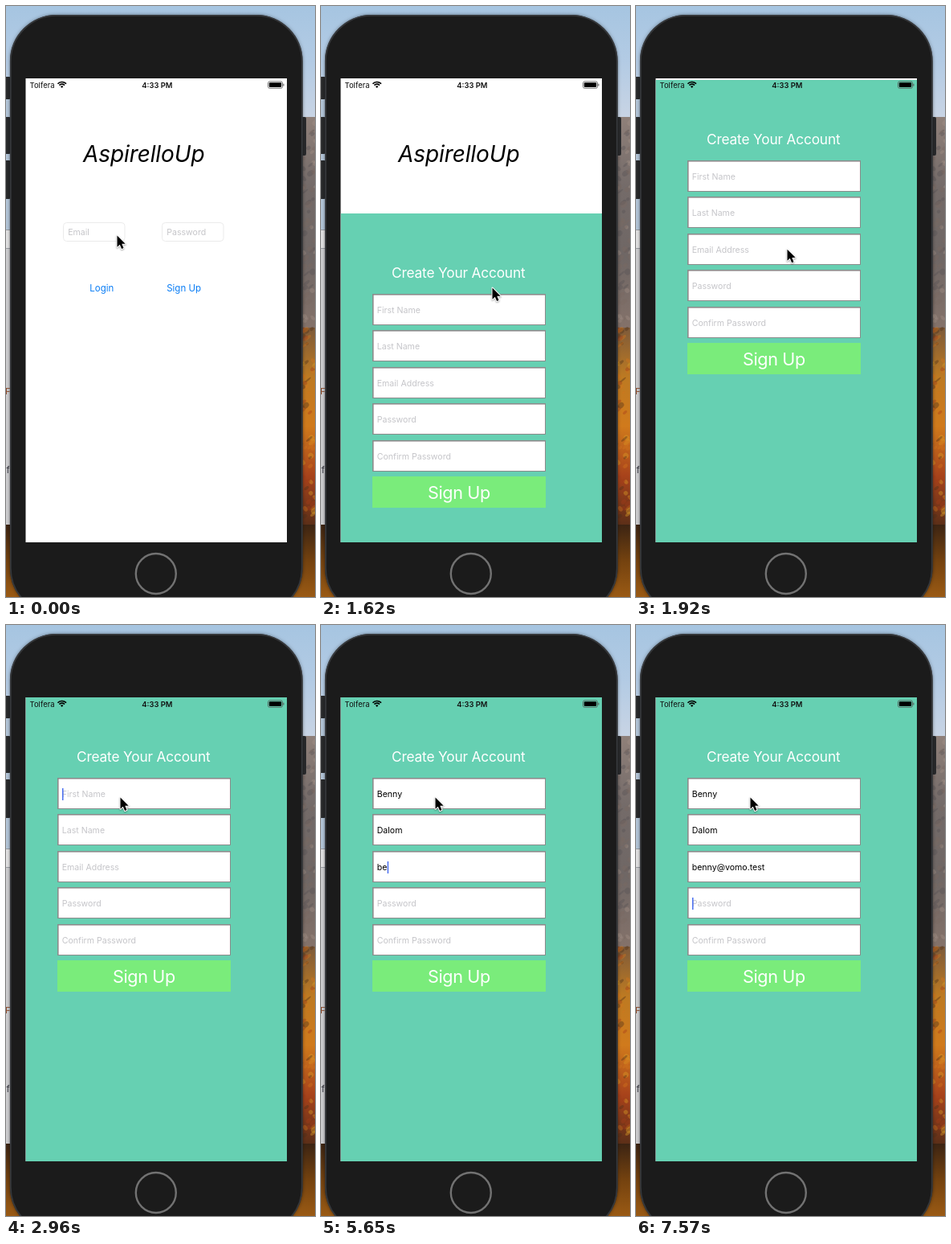
An HTML page with a canvas that plays this animation: 385x735 px, repeating every 8000 ms.

```html
<!DOCTYPE html>
<html lang="en">
<head>
<meta charset="utf-8">
<title>Sign-up demo</title>
<style>
  html, body { margin: 0; width: 100%; height: 100%; overflow: hidden; background: #1b1b1b; }
  canvas { display: block; width: 100vw; height: 100vh; }
</style>
</head>
<body>
<canvas id="stage" width="385" height="735"></canvas>
<script>
const W = 385, H = 735, LOOP = 8000;
const SCREEN = { x: 24.5, y: 90, w: 325.5, h: 577 };
const FORM = { x: 64, y: 190, w: 216, h: 39, pitch: 45.4 };
const TEAL = '#66d0b2', GREEN = '#7aec7b', BLUE = '#0a7df5', HINT = '#c5c5c9', BODY = '#1b1b1b';
const FONT_SIZE = 10.6;

// The picture advances in beats, like a screen recording.
const BEAT = 148.6, BEAT_OFFSET = 18;
const PRESS = 10, SLIDE = 11, SLIDE_FROM = 168, SLIDE_DECAY = 0.12;
const BLINK_AFTER = 3;

const EMAIL_BOX = { x: 138.5, y: 285.5 }, SIGN_UP = { x: 213.5, y: 350.5 }, NAME_BOX = { x: 142.5, y: 214.5 };

// focus: beat the caret arrives; bursts: first and last beat, letters reached
const FIELDS = [
  { hint: 'First Name', value: 'Benny', focus: 20, bursts: [{ from: 24, to: 28, letters: 5 }] },
  { hint: 'Last Name', value: 'Dalom', focus: 29, bursts: [{ from: 31, to: 34, letters: 5 }] },
  { hint: 'Email Address', value: 'benny@vomo.test', focus: 35, bursts: [
    { from: 37, to: 41, letters: 6 }, { from: 43, to: 46, letters: 10 }, { from: 48, to: 50, letters: 15 }
  ] },
  { hint: 'Password', value: '', focus: 51, bursts: [] },
  { hint: 'Confirm Password', value: '', focus: Infinity, bursts: [] }
];

const ctx = document.getElementById('stage').getContext('2d');
const backdrop = makeBackdrop();

const clamp = v => Math.min(1, Math.max(0, v));
const smooth = v => v * v * (3 - 2 * v);

function rect(c, x, y, w, h, color) {
  c.fillStyle = color;
  c.fillRect(x, y, w, h);
}

function rounded(c, x, y, w, h, r) {
  c.beginPath();
  c.roundRect(x, y, w, h, r);
}

function outline(c, width, color) {
  c.lineWidth = width;
  c.strokeStyle = color;
  c.stroke();
}

function text(c, str, x, y, size, color, style = '', spacing = 0) {
  c.font = `${style} ${size}px Inter, "Open Sans", sans-serif`;
  c.letterSpacing = spacing + 'px';
  c.fillStyle = color;
  c.fillText(str, x, y);
  return c.measureText(str).width;
}

function fade(c, top, bottom, ...colors) {
  const g = c.createLinearGradient(0, top, 0, bottom);
  colors.forEach((color, i) => g.addColorStop(i / (colors.length - 1), color));
  rect(c, 0, top, W, bottom - top, g);
}

function randomizer(seed) {
  return () => (seed = (seed * 16807) % 2147483647) / 2147483647;
}

function makeBackdrop() {
  const canvas = document.createElement('canvas');
  canvas.width = W;
  canvas.height = H;
  const c = canvas.getContext('2d');
  drawDesktop(c);
  drawPhone(c);
  return canvas;
}

function drawDesktop(c) {
  fade(c, 0, 138, '#a6c5e1', '#b3cbe4', '#c8d4e4');
  fade(c, 138, 400, '#8f8079', '#746b69', '#6f6765', '#84726a');
  fade(c, 400, 645, '#7d5a3a', '#bd7a22', '#d07a1c', '#a8431b', '#5c2f18');
  fade(c, 645, H, '#3c2413', '#74420f', '#9a5a14');

  // rock and foliage
  const rand = randomizer(41);
  const rock = ['#575254', '#a39288', '#7b6a62'];
  const leaf = ['#dda028', '#a33c18', '#4e2f18', '#d2761e'];
  c.globalAlpha = 0.4;
  for (let i = 0; i < 120; i++) {
    const y = 145 + rand() * 490;
    const colors = y < 400 ? rock : leaf;
    c.fillStyle = colors[Math.floor(rand() * colors.length)];
    c.beginPath();
    c.ellipse(368 + rand() * 18, y, 2 + rand() * 3, 1 + rand() * 3, -0.7, 0, 7);
    c.fill();
  }
  c.globalAlpha = 1;

  // window behind the phone
  rect(c, 0, 88, 12, 190, '#b4c7da');
  rect(c, 0, 278, 12, 367, '#989ca2');
  rect(c, 0, 279, 12, 22, '#e3e3e4');
  rect(c, 0, 302, 12, 343, '#cfcfd1');
  text(c, 'F', -1, 483, 11, '#8c4a2a');
  text(c, 'f', 0.5, 581, 11, '#303038');
}

function drawPhone(c) {
  for (const [x, y, h] of [[-4, 88, 28], [-4, 138, 46], [-4, 192, 48], [364, 138, 48]]) {
    rounded(c, x, y, 10, h, 2);
    c.fillStyle = '#292a2c';
    c.fill();
  }
  c.save();
  c.shadowColor = 'rgba(0,0,0,.45)';
  c.shadowBlur = 4;
  rounded(c, 5, 11, 364.5, 746, 58);
  c.fillStyle = BODY;
  c.fill();
  c.restore();
  rounded(c, 5.8, 11.8, 363, 744.4, 57);
  outline(c, 1.8, '#36383b');

  c.beginPath();
  c.arc(186.8, 706, 25, 0, 7);
  outline(c, 2.4, '#727272');
}

function drawStatusBar(c) {
  text(c, 'Tolfera', 29.5, 101.7, 9.5, '#111');
  text(c, '4:33 PM', 169.3, 101.7, 9.4, '#111', '600');

  const arc = r => c.arc(69.7, 101.7, r, -Math.PI * 0.76, -Math.PI * 0.24);
  for (const r of [7.2, 4.5]) {
    c.beginPath();
    arc(r);
    outline(c, 1.7, '#000');
  }
  c.beginPath();
  c.moveTo(69.7, 102);
  arc(2.4);
  c.fillStyle = '#000';
  c.fill();

  rounded(c, 326.5, 93.9, 18, 8.4, 2);
  outline(c, 0.8, '#555');
  rounded(c, 327.8, 95.2, 15.4, 5.8, 1);
  c.fill();
  rect(c, 345.4, 96.7, 1, 2.8, '#555');
}

function drawInput(c, x, hint) {
  rounded(c, x, 269.5, 76.5, 23, 4);
  outline(c, 0.9, '#e9e9e9');
  text(c, hint, x + 5.7, 285, FONT_SIZE, HINT);
}

function drawLogin(c, pressed) {
  rect(c, SCREEN.x, SCREEN.y, SCREEN.w, SCREEN.h, '#fff');
  text(c, 'AspirelloUp', 96, 194, 28, '#000', 'italic', -0.1);
  drawInput(c, 71.5, 'Email');
  drawInput(c, 194.5, 'Password');
  text(c, 'Login', 104.3, 355.3, 11.5, BLUE);
  text(c, 'Sign Up', 200.2, 355.3, 11.5, pressed ? '#c9e3fc' : BLUE);
}

function lettersTyped(field, beat) {
  let done = 0;
  for (const { from, to, letters } of field.bursts) {
    const part = clamp((beat - from + 1) / (to - from + 1));
    done += Math.round((letters - done) * part);
    if (part < 1) break;
  }
  return done;
}

function caretShown(field, beat) {
  const keys = field.bursts.flatMap(b => [b.from, Math.min(beat, b.to)]);
  const last = Math.max(field.focus, ...keys.filter(k => k <= beat));
  return beat - last < BLINK_AFTER;
}

function drawField(c, field, y, beat, focused) {
  rect(c, FORM.x, y, FORM.w, FORM.h, '#8b8b8b');
  rect(c, FORM.x + 1.6, y + 1.6, FORM.w - 2.6, FORM.h - 2.6, '#fff');
  const typed = field.value.slice(0, lettersTyped(field, beat));
  const width = text(c, typed || field.hint, 69.7, y + 24.2, FONT_SIZE, typed ? '#000' : HINT);
  if (focused && caretShown(field, beat)) {
    rect(c, 70 + (typed ? width : 0), y + 13, 1.5, 15, '#4a6ff0');
  }
}

function drawSignUp(c, beat) {
  const shift = Math.round(SLIDE_FROM * SLIDE_DECAY ** (beat - SLIDE));
  c.save();
  c.beginPath();
  c.rect(SCREEN.x, SCREEN.y, SCREEN.w, SCREEN.h);
  c.clip();
  c.translate(0, shift);
  rect(c, SCREEN.x, SCREEN.y, SCREEN.w, SCREEN.h, TEAL);
  text(c, 'Create Your Account', 88, 169.8, 17.3, '#fff', '', -0.17);

  const active = FIELDS.findLast(f => f.focus <= beat);
  FIELDS.forEach((field, i) => {
    drawField(c, field, Math.round(FORM.y + i * FORM.pitch), beat, field === active);
  });

  rect(c, FORM.x, 417, FORM.w, 39, GREEN);
  text(c, 'Sign Up', 133, 444.7, 21.6, '#fff', '', -0.38);
  c.restore();
}

function pointerAt(beat) {
  const move = (a, b, start, beats) => {
    const k = smooth(clamp((beat - start) / beats));
    return { x: a.x + (b.x - a.x) * k, y: a.y + (b.y - a.y) * k };
  };
  return beat < SLIDE ? move(EMAIL_BOX, SIGN_UP, 0, 5) : move(SIGN_UP, NAME_BOX, SLIDE, 5);
}

function drawPointer(c, { x, y }) {
  const shape = [[0, 0], [0, 14.2], [3.3, 11.2], [5.6, 16.5], [8, 15.5], [5.8, 10.3], [10.2, 10.2]];
  c.save();
  c.translate(x, y);
  c.beginPath();
  for (const [px, py] of shape) c.lineTo(px, py);
  c.closePath();
  c.shadowColor = 'rgba(0,0,0,.35)';
  c.shadowBlur = 2;
  c.shadowOffsetY = 1;
  c.lineJoin = 'round';
  outline(c, 2, '#fff');
  c.shadowColor = 'transparent';
  c.fillStyle = '#000';
  c.fill();
  c.restore();
}

function draw(t) {
  const beat = Math.floor((t + BEAT_OFFSET) / BEAT);
  ctx.drawImage(backdrop, 0, 0);
  drawLogin(ctx, beat >= PRESS);
  if (beat >= SLIDE) drawSignUp(ctx, beat);
  drawStatusBar(ctx);
  drawPointer(ctx, pointerAt(beat));
}

function tick() {
  draw(performance.now() % LOOP);
  requestAnimationFrame(tick);
}
tick();
</script>
</body>
</html>
```
